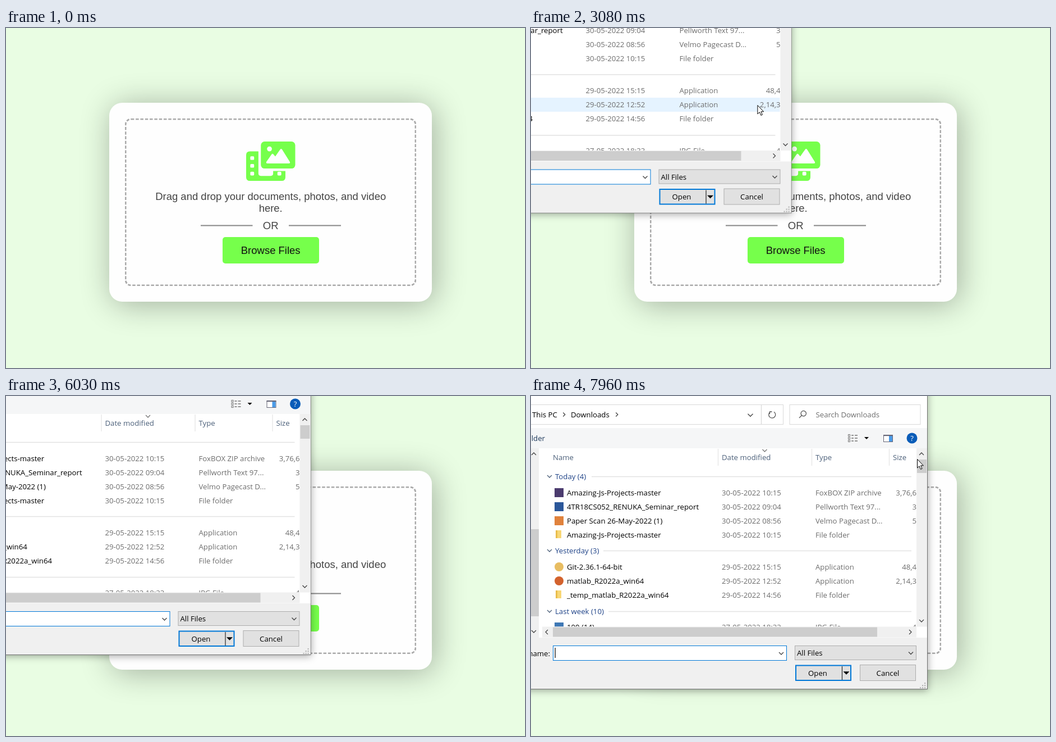
Write an HTML page that moves like this. It is 925 px wide and 605 px high and loops after 8000 ms.

```html
<!DOCTYPE html>
<html lang="en">
<head>
<meta charset="utf-8">
<title>File upload</title>
<style>
  html, body { margin: 0; width: 100%; height: 100%; overflow: hidden; background: #e9fde3; }
  #card { position: absolute; left: 184px; top: 133px; width: 622px; height: 383px;
    transform: scale(.9245); transform-origin: 0 0; border-radius: 25px; background: #fefefe;
    box-shadow: 5px 5px 60px rgba(0, 0, 0, .31); }
  #drop { position: absolute; inset: 30px; border: 3px dashed #aaa; border-radius: 12px; }
  svg { position: absolute; left: 0; top: 0; }
  .page { font: 18.49px "Liberation Sans", Arial, sans-serif; fill: #444; }
  .ui { font: 13.2px "Open Sans", "Noto Sans", sans-serif; }
  .line { fill: none; stroke-width: 1.3; }
</style>
</head>
<body>
<div id="card"><div id="drop"></div></div>
<svg width="925" height="605" viewBox="0 0 925 605">
  <defs>
    <filter id="soft" x="-10%" y="-10%" width="120%" height="120%"><feGaussianBlur stdDeviation="7"/></filter>
  </defs>
  <g transform="translate(428 202) scale(.1367)" fill="#76ff4b">
    <path d="M48 128H160V416Q160 448 192 448H320Q352 448 352 416V384H512V464Q512 512 464 512H48Q0 512 0 464V176Q0 128 48 128Z"/>
    <rect x="192" width="448" height="352" rx="48"/>
    <g fill="#fefefe">
      <circle cx="304" cy="96" r="32"/>
      <path d="M276 272 344 174 380 218 456 110 558 272Z" stroke="#fefefe" stroke-width="28" stroke-linejoin="round"/>
      <rect x="54" y="192" width="50" height="48" rx="12"/>
      <rect x="54" y="293" width="50" height="48" rx="12"/>
      <rect x="54" y="394" width="50" height="48" rx="12"/>
      <rect x="408" y="394" width="50" height="48" rx="12"/>
    </g>
  </g>
  <g class="page" text-anchor="middle">
    <text x="471.7" y="306">Drag and drop your documents, photos, and video</text>
    <text x="471.7" y="327.4">here.</text>
    <text x="471.7" y="358">OR</text>
    <path d="M347 351.5H439.5M504 351.5H597" stroke="#888" stroke-width="1.85"/>
    <rect x="386" y="372" width="172" height="47" rx="5" fill="#76ff4b"/>
    <text x="471.7" y="401.6" fill="#111">Browse Files</text>
  </g>
  <g id="dialog" class="ui"></g>
  <circle id="press" cx="525" cy="384" r="14" fill="#ff0" fill-opacity=".47"/>
  <circle id="busy" cx="540" cy="385" r="5.5" fill="none" stroke="#1f8fe0" stroke-width="2.5"/>
  <g id="cursor" fill="#fff" stroke="#000" stroke-linejoin="round">
    <path id="arrow" d="M.5 .5V16L4 12.7 6.5 18.4 9 17.3 6.6 11.8H11.3Z"/>
    <path id="hand" d="M-2 13V2Q-2 .5 -.5 .5T1 2V8Q4-.0 4 8 7-.0 7 9 10.5 5 10.5 11V15Q10 18 8 21.5H-1Q-2 18 -5.5 13-5 9.500 -2 13Z"/>
  </g>
</svg>
<script>
const $ = id => document.getElementById(id);
const GREY = '#6d6d6d', BLUE = '#0078d7', HEAD = '#4c607a';

const text = (x, y, s, fill = '#000', anchor = 'start') =>
  `<text x="${x}" y="${y + 4.7}" fill="${fill}" text-anchor="${anchor}">${s}</text>`;
const rect = (x, y, w, h, fill, stroke = 'none', width = 1) =>
  `<rect x="${x}" y="${y}" width="${w}" height="${h}" fill="${fill}" stroke="${stroke}" stroke-width="${width}"/>`;
const path = (d, stroke = '#555') => `<path class="line" d="${d}" stroke="${stroke}"/>`;
const dot = (x, y, r, fill) => `<circle cx="${x}" cy="${y}" r="${r}" fill="${fill}"/>`;
const chevron = (x, y, turn = 0, size = 4, color = '#444') =>
  `<path class="line" transform="translate(${x} ${y}) rotate(${turn})" d="M${-size} ${-size / 2}L0 ${size / 2} ${size} ${-size / 2}" stroke="${color}"/>`;
const triangle = (x, y, r) => `<path d="M${x - r} ${y - r / 2}h${2 * r}l${-r} ${r}z"/>`;

const square = color => y => rect(42, y - 8, 16, 16, color);
const round = color => y => dot(50, y, 8, color);
const folder = y => rect(44, y - 8, 10, 14, '#f8d775') + rect(44, y - 8, 3, 14, '#e9bd4c');

const files = [
  [172, 'Amazing-Js-Projects-master', '30-05-2022 10:15', 'FoxBOX ZIP archive', '3,76,6', square('#4b3b6e')],
  [197, '4TR18CS052_RENUKA_Seminar_report', '30-05-2022 09:04', 'Pellworth Text 97...', '3', square('#2b579a')],
  [222, 'Paper Scan 26-May-2022 (1)', '30-05-2022 08:56', 'Velmo Pagecast D...', '5', square('#e0823c')],
  [247, 'Amazing-Js-Projects-master', '30-05-2022 10:15', 'File folder', '', folder],
  [304, 'Git-2.36.1-64-bit', '29-05-2022 15:15', 'Application', '48,4', round('#e8bd62')],
  [329, 'matlab_R2022a_win64', '29-05-2022 12:52', 'Application', '2,14,3', round('#d3622d')],
  [354, '_temp_matlab_R2022a_win64', '29-05-2022 14:56', 'File folder', '', folder],
  [411, '100 (14)', '27-05-2022 18:33', 'JPG File', '4', square('#3f78b5')],
];
const groups = [[143, 'Today (4)', 108], [275, 'Yesterday (3)', 129], [383, 'Last week (10)', 138]];

const fileRow = ([y, name, date, type, size, icon]) => icon(y) + text(64, y, name) +
  text(340, y, date, GREY) + text(507, y, type, GREY) + text(687, y, size, GREY, 'end');
const groupRow = ([y, label, x]) => chevron(33, y, 0, 4, HEAD) + text(43, y, label, '#1e4287') +
  path(`M${x} ${y + .5}H678`, '#e2e2e2');

function buildDialog() {
  const list = rect(-10, 93, 716, 337, '#fff') +
    '<rect id="hover" x="20" width="666" height="25" fill="#e5f3ff"/>' +
    [[39, 'Name'], [340, 'Date modified'], [507, 'Type'], [645, 'Size']].map(([x, s]) => text(x, 109, s, HEAD)).join('') +
    path('M333.5 94V124M500.500 94V124M638.500 94V124', '#e5e5e5') + chevron(416.5, 97, 0, 4, '#777') +
    groups.map(groupRow).join('') + files.map(fileRow).join('');

  const scrollbars =
    rect(-10, 93, 24, 337, '#f0f0f0') + rect(-10, 237, 24, 155, '#cdcdcd') +
    chevron(5, 103, 180) + chevron(5, 419) +
    rect(687, 93, 19, 318, '#f0f0f0') + rect(688, 113, 17, 24, '#cdcdcd') +
    chevron(696, 103, 180) + chevron(696, 400) +
    rect(14, 410.5, 692, 19.5, '#fff') + rect(20, 410.5, 667, 19, '#f0f0f0') +
    rect(39, 411.5, 578, 17, '#cdcdcd') + chevron(28, 420, 90) + chevron(676, 420, -90);

  const address = rect(-10, 15.5, 459.5, 35, '#fff', '#d9d9d9') + path('M410.5 15.500V50', '#d9d9d9') +
    rect(461, 15.5, 233, 35, '#fff', '#d9d9d9') +
    text(2, 33, 'This PC') + chevron(59, 33, -90, 3.5) + text(71, 33, 'Downloads') + chevron(153, 33, -90, 3.5) +
    chevron(391, 34, 0, 4.5) + path('M426 28.500A6 6 0 1 0 433 28.200M425.500 32V28H429.500') +
    path('M482.500 34.500 478 39M482.500 34.500A4.700 4.700 0 1 1 485.500 35.800 4.700 4.700 0 0 1 482.500 34.500') +
    text(507.5, 33, 'Search Downloads', GREY);

  const viewIcon = [69, 74, 79].map(y => rect(565.5, y - .5, 3, 3, '#fff', '#777') +
    path(`M571 ${y + 1}H575M577 ${y + 1}H582`, '#777')).join('');
  const toolbar = rect(-10, 57, 716, 36, '#f5f6f7') + text(25, 75, 'New folder', '#1e395b', 'end') +
    viewIcon + triangle(598, 75, 4) +
    rect(628.5, 69.5, 16, 12, '#fff', '#667') + rect(638, 71, 6, 10, '#4a9be8') + path('M628 70.500H645', '#667') +
    dot(679, 75, 9.5, '#0a5cb8') + text(679, 75, '?', '#fff', 'middle');

  const grip = [0, 1, 2].flatMap(row => [...Array(row + 1).keys()].map(i =>
    rect(701 - 4 * i, 510 + 4 * row, 2.2, 2.2, '#b5b5b5'))).join('');
  const footer = rect(-10, 430, 716, 91, '#f0f0f0') + text(34, 458, 'File name:', '#000', 'end') +
    rect(39.5, 444.5, 416, 26, '#fff', BLUE) + chevron(446, 458) +
    '<rect id="caret" x="42.500" y="448" width="1.200" height="18"/>' +
    rect(470.5, 444.5, 216, 25, '#e1e1e1', '#adadad') + text(474, 457.5, 'All Files') + chevron(677, 457.5) +
    rect(472, 479.5, 98, 26.5, '#e1e1e1', BLUE, 2) + path('M554.500 481V505', '#333') + triangle(562, 493, 5.5) +
    text(511, 493, 'Open', '#000', 'middle') +
    rect(586.5, 478.5, 99, 28, '#e1e1e1', '#adadad') + text(636, 493, 'Cancel', '#000', 'middle') + grip;

  return `<rect x="-60" y="-60" width="767" height="584" fill-opacity=".36" filter="url(#soft)"/>` +
    rect(-60, -60, 766.5, 581.5, '#fff', '#707070') + list + scrollbars + address + toolbar + footer;
}
$('dialog').innerHTML = buildDialog();

// Dialog offset while dragged: [step, x, y]; motion advances in equal steps.
const drag = [[-1, -242.5, -192.5], [0, -228.5, -168.5], [7, -163.5, -61], [10, -96, -16], [13, -56.5, -10], [21, 0, 0]];
// Pointer moves: [start, end, steps, from, to, visible until].
const moves = [
  [440, 990, 7, [697, 542], [526, 384], 2590],
  [2590, 3390, 10, [520, 366], [358, 48], 3450],
  [3450, 3780, 4, [340, 48], [256, 53], 4010],
  [7420, 7960, 7, [655, -8], [688, 112], 8000],
];
const lerp = (a, b, p) => a + (b - a) * p;
const show = (id, on) => $(id).setAttribute('visibility', on ? 'inherit' : 'hidden');

function dialogOffset(t) {
  const step = Math.max(-1, Math.min(21, Math.floor((t - 5490) / 76.5)));
  const i = Math.max(1, drag.findIndex(key => key[0] >= step));
  const [a, b] = [drag[i - 1], drag[i]], p = (step - a[0]) / (b[0] - a[0]);
  return [lerp(a[1], b[1], p), lerp(a[2], b[2], p)];
}

function pointer(t) {
  const move = moves.find(m => t >= m[0] && t < m[5]);
  if (!move) return null;
  const [start, end, steps, from, to] = move;
  const p = Math.min(1, Math.floor((t - start) / (end - start) * steps + .01) / steps);
  const eased = p * (1.5 - p / 2);
  return [lerp(from[0], to[0], eased), lerp(from[1], to[1], eased)];
}

function draw(t) {
  const [dx, dy] = dialogOffset(t), at = pointer(t);
  const opacity = Math.max(0, Math.min(1, (Math.floor((t - 1860) / 81) + 1) / 6));
  $('dialog').setAttribute('transform', `translate(${dx} ${dy})`);
  $('dialog').setAttribute('opacity', opacity);
  show('caret', Math.floor((t - 7440) / 530) % 2 === 0);

  const row = at && opacity === 1 && at[0] - dx < 686 &&
    files.find(([y]) => y < 400 && Math.abs(at[1] - dy - y) <= 12.5);
  show('hover', row);
  if (row) $('hover').setAttribute('y', row[0] - 12.5);

  show('cursor', at);
  if (at) {
    const overButton = t < 1630 && at[0] > 386 && at[0] < 558 && at[1] > 372 && at[1] < 419;
    show('hand', at && overButton);
    show('arrow', at && !overButton);
    $('cursor').setAttribute('transform', `translate(${at})`);
  } else {
    show('hand', false);
    show('arrow', false);
  }
  show('press', t >= 1220 && t < 1470);
  show('busy', t >= 1860 && t < 2190);
}

function tick() {
  draw(performance.now() % 8000);
  requestAnimationFrame(tick);
}
tick();
</script>
</body>
</html>
```
